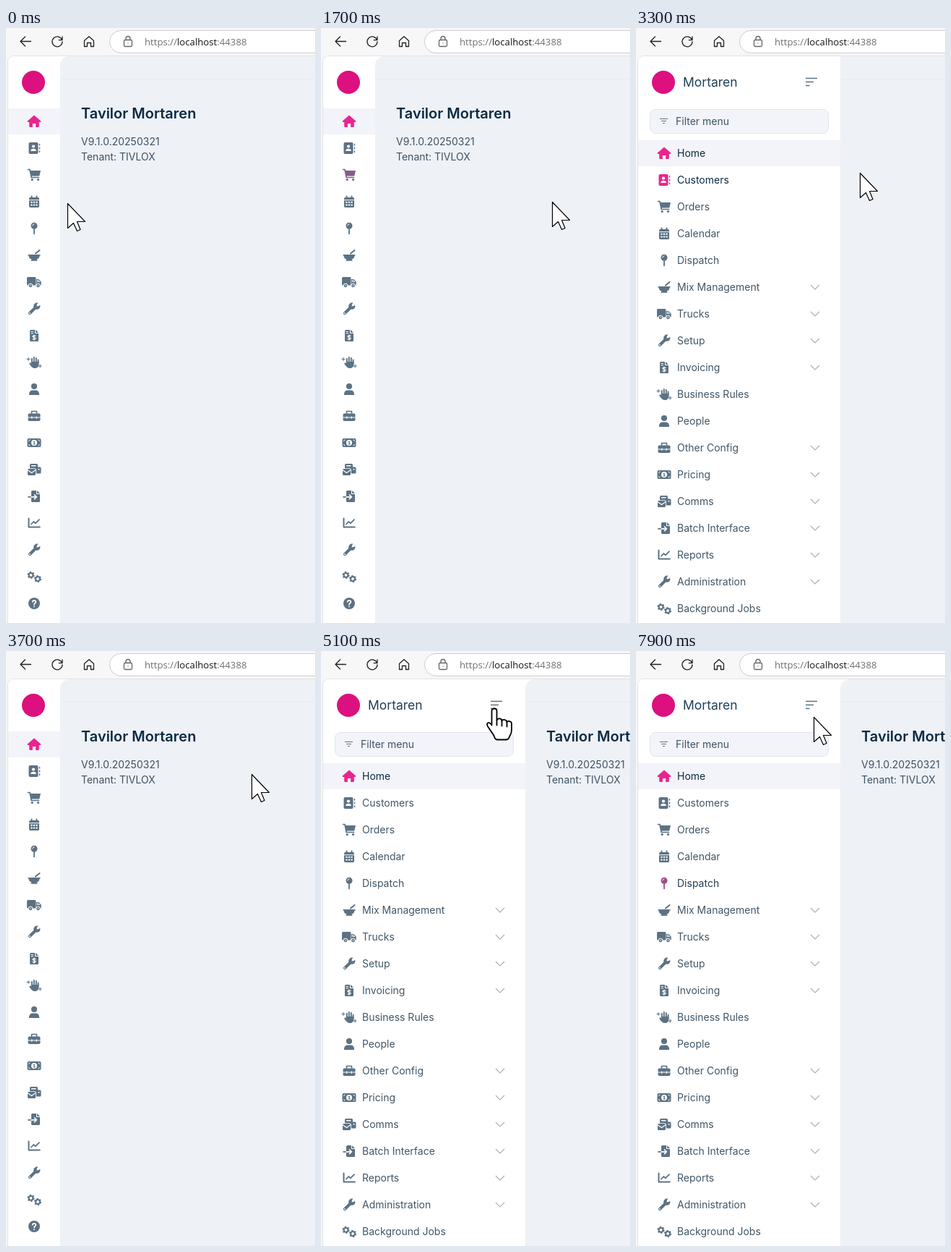
An HTML page for the animation above (8 s loop, 428x822 px).

```html
<!DOCTYPE html>
<html lang="en">
<head>
<meta charset="utf-8">
<title>Sidebar menu</title>
<style>
html, body { margin: 0; width: 100%; height: 100%; overflow: hidden; background: #f7f7f7; }
#stage { position: relative; width: 428px; height: 822px; overflow: hidden; font: 14px/20px Inter, sans-serif; color: #3d5365; }
#stage * { position: absolute; box-sizing: border-box; white-space: nowrap; }
#stage svg { overflow: visible; }
#stage b, #stage tspan { position: static; font-weight: 400; }
#bar { left: 143px; top: 3px; width: 320px; height: 32px; border: 1px solid #cdcdcd; border-radius: 16px; background: #fff; }
#url { left: 192px; top: 9px; font: 13.2px/20px "Open Sans", sans-serif; color: #707070; }
#url b { color: #111; }
#page { left: 2px; top: 38px; width: 440px; height: 800px; border: 1px solid #e2e2e4; border-radius: 9px 0 0 0; background: #fff; }
#content { top: 39px; width: 440px; height: 800px; background: #eef1f6; border-radius: 13px 0 0 0; }
#content i { left: 0; top: 31px; width: 100%; height: 1px; background: #e7ebf1; }
#title { left: 29px; top: 67px; font: 600 20px/24px Inter, sans-serif; color: #0b2a42; }
#side { left: 3px; top: 39px; height: 783px; background: #fff; border-radius: 8px 0 0 0; overflow: hidden; }
#logo { left: 19px; top: 20px; width: 32px; height: 32px; border-radius: 50%; background: #dc107e; }
#brand { left: 62px; top: 24px; font-size: 17.5px; line-height: 24px; color: #1f4056; }
#filter { left: 16px; top: 73px; width: 248px; height: 34px; border: 1px solid #e2e5ee; border-radius: 8px; background: #f3f4fa; }
#filter span { left: 35px; top: 6px; }
.row { left: 0; width: 280px; height: 36px; }
.row.on { background: #f3f4f9; }
.row svg { left: 36px; top: 18px; width: 1px; height: 1px; }
.row span { left: 54px; top: 8px; }
.row svg.more { left: 244.5px; }
.f { fill: currentColor; }
.s { fill: none; stroke: currentColor; stroke-width: 2; stroke-linecap: round; stroke-linejoin: round; }
.w { fill: #fff; }
.ws { fill: none; stroke: #fff; stroke-width: 1.3; stroke-linecap: round; }
#lines, #chrome, #cursor { left: 0; top: 0; width: 1px; height: 1px; }
</style>
</head>
<body>
<div id="stage">
  <div id="bar"></div>
  <svg id="chrome" fill="none" stroke="#222" stroke-width="1.3" stroke-linecap="round" stroke-linejoin="round">
    <path d="M34.5 18.5H20M26.5 12L20 18.5L26.5 25"/>
    <path d="M77.6 16.5A7 7 0 1 0 78 19M78 12V16.7H73.3"/>
    <path d="M108.5 17.5L115 11.8L121.5 17.5V25.5H117.5V20.5H112.5V25.5H108.5Z"/>
    <g stroke="#666"><rect x="163.5" y="16.5" width="11" height="9" rx="1.5"/><path d="M166 16V14.5A3 3 0 0 1 172 14.5V16M169 20.9V21.1"/></g>
  </svg>
  <div id="url">https://<b>localhost</b>:44388</div>
  <div id="page"></div>
  <div id="content">
    <i></i>
    <div id="title">Tavilor Mortaren</div>
    <div style="left:29px;top:108px">V9.1.0.20250321</div>
    <div style="left:29px;top:129px">Tenant: TIVLOX</div>
  </div>
  <div id="side">
    <div id="logo"></div>
    <div id="head">
      <div id="brand">Mortaren</div>
      <svg id="lines" fill="none" stroke="#5c7283" stroke-width="1.7"><path d="M232 30.5H248M232 35.5H243M232 40.5H237.5"/></svg>
      <div id="filter">
        <svg id="lines2" style="left:0;top:0" fill="none" stroke="#5c7283" stroke-width="1.2"><path d="M13 12.5H24M15 15.5H22M17 18.5H20"/></svg>
        <span>Filter menu</span>
      </div>
    </div>
  </div>
  <svg id="cursor" fill="#fff" stroke="#000" stroke-linejoin="round">
    <path id="arrow" stroke-width="1.2" d="M0 0V34L8 27L13 38L17.5 36L13 25H24Z"/>
    <g id="hand" stroke-width="1.8" stroke-linecap="round">
      <path d="M-4 3C-4-1 3-1 3 3V16C4 13 10 13 10 17C11 14.5 17 15 17 19C18 16.5 23.5 17 23.5 21V30C23.5 35 21 37 20 40Q19 43 16 43H4Q1 43 0 40C-1 36-5 32-8 27C-13 21-9 17-5 21.500L-4 23Z"/>
      <path fill="none" d="M3 16V23M10 17V24M17 19V25"/>
    </g>
  </svg>
</div>
<script>
const $ = id => document.getElementById(id);
const fill = d => `<path class="f" d="${d}"/>`;
const line = (d, w = 2) => `<path class="s" style="stroke-width:${w}" d="${d}"/>`;
const cut = (d, w = 1.3) => `<path class="ws" style="stroke-width:${w}" d="${d}"/>`;
const dot = (x, y, r, c = 'f') => `<circle class="${c}" cx="${x}" cy="${y}" r="${r}"/>`;
const box = (x, y, w, h, r = 1.5, c = 'f') => `<rect class="${c}" x="${x}" y="${y}" width="${w}" height="${h}" rx="${r}"/>`;
const gear = (x, y) => dot(x, y, 2.9, 's') +
  `<circle class="s" cx="${x}" cy="${y}" r="4.2" style="stroke-linecap:butt;stroke-width:1.8;stroke-dasharray:2.2 2.198"/>`;
const file = fill('M-4.500-8H1V-3H6V6.500Q6 8 4.500 8H-4.500Q-6 8-6 6.500V-6.500Q-6-8-4.500-8ZM2-8L6-4H2Z');
const wrench = line('M-6 6L2.500-2.500', 4) + dot(3.8, -3.8, 4.6) +
  '<path class="w" d="M3.500-3.500L4-6.500L7-10L10-7L6.500-4Z"/>' + dot(-6, 6, .9, 'w');

const items = [
  ['Home', 0, fill('M0-8.500L9.500-.3Q9.500 1 8 1H6.800V6.500Q6.800 8 5.300 8H2.200V3H-2.200V8H-5.300Q-6.800 8-6.800 6.500V1H-8Q-9.500 1-9.500-.3Z')],
  ['Customers', 0, box(-7.5, -8, 13, 16, 2) + dot(-1, -2.5, 2.1, 'w') +
    '<path class="w" d="M-4.800 4C-4.800 1.500-3.500.8-1 .8S2.800 1.500 2.800 4Z"/>' + line('M7.500-5.500V-4M7.500-.8V.7M7.500 4V5.500', 1.4)],
  ['Orders', 0, line('M-8.500-7.500H-6L-3.800 3.500H6.500', 1.7) + fill('M-5.500-6H9L7.200 1.500H-4Z') + dot(-2.8, 6.5, 1.6) + dot(5.5, 6.5, 1.6)],
  ['Calendar', 0, box(-7, -6, 14, 14, 1.8) + line('M-3.500-7.500V-5M3.500-7.500V-5') +
    cut('M-6.500-2.300H6.500', 1) + cut('M-4 .7H-3.200M-.4.7H.4M3.200.7H4M-4 4.500H-3.200M-.4 4.500H.4M3.200 4.500H4', 1.9)],
  ['Dispatch', 0, dot(0, -3.8, 4.5) + line('M0 1V7.300', 1.8) + cut('M-2.300-4Q-2-6 0-6.200', 1)],
  ['Mix Management', 1, fill('M-8.500-1H8.500V.5H7.500C7.500 3.500 5.500 5 3.500 5.800L4.800 7.800H-4.800L-3.500 5.800C-5.500 5-7.500 3.500-7.500.5H-8.500Z') + line('M2-2.500L7.500-7', 2)],
  ['Trucks', 1, box(-10, -7, 12.5, 11.5) + fill('M3-4H6.300L9.700-.5V4.500H3Z') + cut('M4.700-2.500H6L7.800-.5H4.700Z', .9) +
    dot(-5, 5, 3.2, 'w') + dot(5.5, 5, 3.2, 'w') + dot(-5, 5, 2.3) + dot(5.5, 5, 2.3) + dot(-5, 5, .8, 'w') + dot(5.5, 5, .8, 'w')],
  ['Setup', 1, wrench],
  ['Invoicing', 1, file + cut('M-4-5.500H-1.500M-4-3.200H-1.500', 1) + cut('M2 .5Q0-.8-1.600.5T0 2.500T1.600 4.500T-2 4.700M0-1V6.300', 1.1)],
  ['Business Rules', 0, line('M-3.200 1V-5M-.2 0V-7M2.800 0V-6M5.600 1V-3.500', 1.9) + fill('M-4.200-1H6.500V2C6.500 6 4 8 1 8C-2 8-4 6-7 1.500L-5.500.2L-4.200 1.500Z') +
    line('M-8-6.500V-2.500M-10-4.500H-6M8.200 3V7M6.200 5H10.200', 1.1)],
  ['People', 0, dot(0, -4, 4.1) + fill('M-7 8V7C-7 3.500-5 1.500-2 1.500H2C5 1.500 7 3.500 7 7V8Z')],
  ['Other Config', 1, box(-8.5, -3.5, 17, 10.5, 2) + line('M-3.500-4V-6.500H3.500V-4', 1.7) + cut('M-8.500 2H-4M-2.500 2H2.500M4 2H8.500M-3.200.8V3.500M3.200.8V3.500', 1.1)],
  ['Pricing', 1, box(-9.5, -6, 19, 12, 2) + dot(0, 0, 4, 'w') + line('M-.8-1.200L.2-1.900V1.900M-.8 1.900H1.200', 1.1) + cut('M-7.500-2.500Q-6-2.700-6-4.200M7.500-2.500Q6-2.700 6-4.200M-7.500 2.500Q-6 2.700-6 4.200M7.500 2.500Q6 2.700 6 4.200', 1)],
  ['Comms', 1, box(-6, -8, 11, 9) + box(2, -3.5, 7.5, 9) + box(-9.8, -1.8, 12.6, 10.6, 2, 'w') + box(-9, -1, 11, 9) +
    cut('M-8.500 1L-3.500 4.500L1.500 1', 1.2) + cut('M-3.500-5.300H2M6-.3H7', 1.4)],
  ['Batch Interface', 1, file.replace('<path', '<path transform="translate(2)"') + cut('M-3.500.8H3M.5-2L3.300.8L.5 3.600', 1.7) + line('M-8 .8H-5', 1.7)],
  ['Reports', 1, line('M-7.500-6.500V5.500H7.800') + line('M-4 1.500L-.8-2L2 .2L7-4.800', 1.8)],
  ['Administration', 1, wrench],
  ['Background Jobs', 0, gear(-4.5, -2.2) + gear(5, 3)],
  ['', 0, dot(0, 0, 8) + cut('M-2.200-2.300C-2-5 2.400-4.700 2.300-2C2.200-.4 0-.2 0 1.500M0 4.200V4.300', 1.8)]
];
const rows = items.map(([name, more, art], i) => {
  const el = document.createElement('div');
  el.className = i ? 'row' : 'row on';
  el.innerHTML = `<svg>${art}</svg><span>${name}</span>` +
    (more ? '<svg class="more" fill="none" stroke="#a4b2be" stroke-width="1.2"><path d="M-6-3L0 3L6-3"/></svg>' : '');
  $('side').append(el);
  return el;
});

// Pointer path: step (100 ms each), x, y
const path = [
  [0, 85, 242], [1, 62, 232], [3, 40, 208], [4, 70, 215], [7, 262, 238], [8, 300, 240], [9, 309, 241],
  [10, 300, 241], [12, 66, 232], [13, 50, 230], [14, 110, 240], [15, 240, 244], [16, 300, 243],
  [17, 320, 240], [18, 325, 239], [19, 308, 236], [22, 70, 215], [24, 24, 205], [27, 19, 203],
  [28, 22, 203], [30, 90, 205], [32, 240, 206], [33, 310, 200], [35, 346, 188], [37, 340, 170],
  [40, 70, 70], [42, 46, 49], [44, 62, 56], [46, 170, 72], [48, 238, 76], [50, 240, 79],
  [51, 240, 79], [52, 300, 100], [53, 390, 140], [54, 480, 170], [77, 480, 400], [78, 215, 321], [79, 246, 91]
];
const STEPS = 80, PIN = 50;
const firstRow = open => open ? 173 : 129;

function pointer(k) {
  const n = Math.max(1, path.findIndex(p => p[0] >= k));
  const [a, b] = [path[n - 1], path[n]];
  const u = (k - a[0]) / (b[0] - a[0]);
  return [a[1] + (b[1] - a[1]) * u, a[2] + (b[2] - a[2]) * u];
}

// The menu closes one step after the pointer leaves; icon tints trail the pointer.
const frames = [];
let open = false, wasIn = false, lastRow = -1, tint = items.map(() => 0);
for (let k = 0; k < STEPS; k++) {
  const [x, y] = pointer(k), pinned = k >= PIN;
  const inside = y >= 39 && x < (open ? 283 : 75);
  open = pinned || inside || wasIn;
  tint = tint.map((v, i) => i === lastRow ? Math.min(1, v + .5) : v < .1 ? 0 : v * .25);
  let row = inside ? Math.round((y - firstRow(open)) / 37) : -1;
  if (row < 0 || row >= items.length) row = -1;
  const toggle = open && x > 225 && x < 262 && y > 60 && y < 88;
  frames.push({ x, y, open, pinned, tint, hand: row >= 0 || toggle });
  wasIn = inside;
  lastRow = row;
}

const mix = (a, b, u) => `rgb(${a.map((v, i) => Math.round(v + (b[i] - v) * u))})`;
const GREY = [92, 114, 131], PINK = [234, 36, 142], TEXT = [64, 86, 102], DARK = [14, 42, 66];

let shown = -1;
function draw(now) {
  const k = Math.floor(now % 8000 / 100);
  if (k !== shown) {
    shown = k;
    const f = frames[k];
    $('content').style.left = (f.pinned ? 283 : 75) + 'px';
    $('side').style.width = (f.open ? 280 : 72) + 'px';
    $('head').style.display = f.open ? 'block' : 'none';
    rows.forEach((el, i) => {
      const u = i ? f.tint[i] : 1;
      el.style.top = firstRow(f.open) + 37 * i - 57 + 'px';
      el.children[0].style.color = mix(GREY, PINK, u);
      el.children[1].style.color = mix(TEXT, DARK, u);
      el.children[1].style.display = f.open ? 'block' : 'none';
    });
    $('cursor').style.transform = `translate(${Math.round(f.x) + .5}px, ${Math.round(f.y) + .5}px)`;
    $('arrow').style.display = f.hand ? 'none' : 'inline';
    $('hand').style.display = f.hand ? 'inline' : 'none';
  }
  requestAnimationFrame(draw);
}
let start;
requestAnimationFrame(function begin(now) {
  start = now;
  const loop = draw;
  loop(now - start);
});
</script>
</body>
</html>
```
